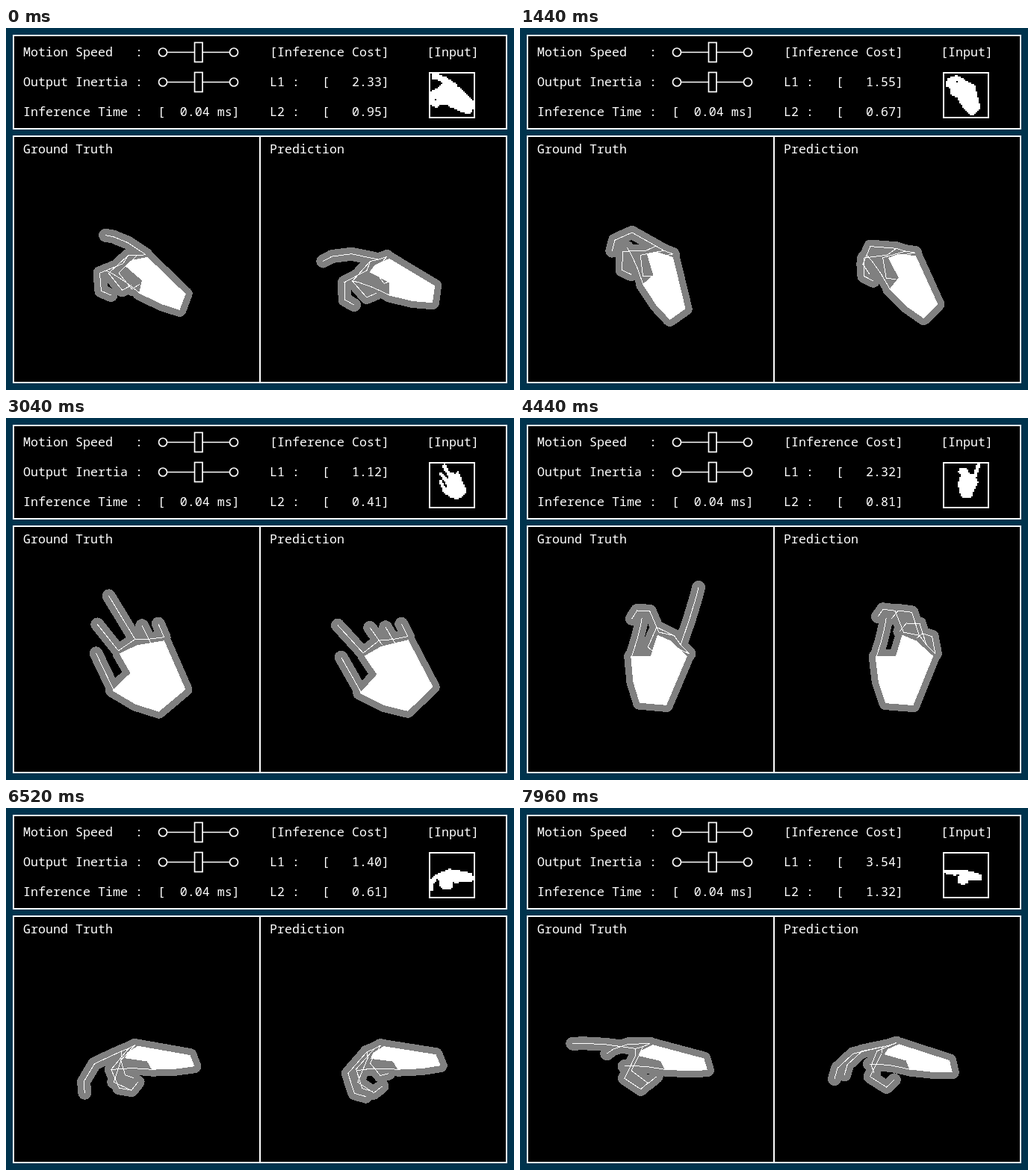
Animation of 680x485 px, one loop 8 s. Source, as an HTML page with a canvas:

```html
<!DOCTYPE html>
<html lang="en">
<head>
<meta charset="utf-8">
<title>Hand pose</title>
<style>
  html, body { margin: 0; width: 100%; height: 100%; overflow: hidden; background: #00334d; }
  svg { position: absolute; left: 0; top: 0; display: block; }
  text { font: 16.667px "Noto Sans Mono", monospace; fill: #fff; white-space: pre; }
  .frame { fill: #000; stroke: #fff; stroke-width: 2; }
  .slider { fill: #000; stroke: #fff; stroke-width: 1.7; }
  #hands { shape-rendering: crispEdges; }
  .skin { fill: none; stroke: #808080; stroke-width: 18; stroke-linejoin: round; stroke-linecap: round; }
  .skin.palm { fill: #808080; }
  .core { fill: #fff; }
  .bones { fill: none; stroke: #fff; stroke-width: 1; }
  #input { position: absolute; left: 568px; top: 61px; width: 58px; height: 58px; image-rendering: pixelated; }
</style>
</head>
<body>
<svg width="680" height="485" viewBox="0 0 680 485">
  <defs>
    <g id="slider" class="slider">
      <path d="M210 0H305"/>
      <circle cx="210" cy="0" r="5.5"/>
      <circle cx="305" cy="0" r="5.5"/>
      <rect x="252.5" y="-13" width="10.5" height="26"/>
    </g>
  </defs>
  <g class="frame">
    <rect x="10" y="10" width="660" height="125"/>
    <rect x="10" y="145" width="660" height="330"/>
    <path d="M340 145V475"/>
    <rect x="567" y="60" width="60" height="60"/>
  </g>
  <use href="#slider" y="32.5"/>
  <use href="#slider" y="72.5"/>
  <text x="23" y="38">Motion Speed   :</text>
  <text x="23" y="78">Output Inertia :</text>
  <text x="23" y="118">Inference Time :  [  0.04 ms]</text>
  <text x="353" y="38">[Inference Cost]</text>
  <text x="353" y="78" id="cost1"></text>
  <text x="353" y="118" id="cost2"></text>
  <text x="563" y="38">[Input]</text>
  <text x="23" y="168">Ground Truth</text>
  <text x="353" y="168">Prediction</text>
  <g id="hands"></g>
</svg>
<canvas id="input" width="29" height="29"></canvas>
<script>
const DURATION = 8000, STEP = 40, LAST = 7960;
const RADIANS = Math.PI / 180;
const $ = id => document.getElementById(id);

// Hand model: x runs across the palm, y from wrist to fingertips, z out of the palm.
const PALM = [
  [-30, 90], [-4, 88], [31, 75], [23, 4], [-23, -4], [-45, 20], [-63, 52], [-30, 60]
];
const CENTER_Y = 55;
const BONES = [38, 28, 15];
const THUMB = { x: -61, y: 50, size: .7, splay: .08 };
const FINGERS = [
  { x: -29, y: 94, size: .95, splay: -.15 },
  { x: -2, y: 96, size: 1.05, splay: -.02 },
  { x: 14, y: 87, size: 1, splay: .06 },
  { x: 33, y: 79, size: .77, splay: .12 }
];
const THUMB_BEND = 6;

// A pose is roll, turn about the forearm, then the bend per joint from index to little finger.
const KEYS = [
  { time: 0, costs: [2.33, .95], zoom: .465,
    truth: [-49, -62, 65, 84, 85, 12], prediction: [-62, -62, 58, 78, 20, 78] },
  { time: 1440, costs: [1.55, .67], zoom: .4,
    truth: [-17, -58, 77, 48, 85, 85], prediction: [-28, -56, 72, 62, 80, 75] },
  { time: 3040, costs: [1.12, .41], zoom: .275,
    truth: [-30, 0, 30, 20, 58, 48], prediction: [-34, 0, 27, 58, 60, 50] },
  { time: 4440, costs: [2.32, .81], zoom: .28,
    truth: [18, -40, 50, 85, 3, 85], prediction: [17, -38, 48, 48, 50, 45] },
  { time: 5320, costs: [2.09, .76], zoom: .29,
    truth: [-24, -75, 74, 27, 76, 45], prediction: [-20, -65, 82, 20, 50, 82] },
  { time: 6520, costs: [1.40, .61], zoom: .365,
    truth: [-82, -72, 80, 34, 60, 57], prediction: [-83, -72, 75, 57, 57, 68] },
  { time: LAST, costs: [3.54, 1.32], zoom: .265,
    truth: [-77, -72, 78, 5, 78, 17], prediction: [-74, -72, 80, 30, 30, 42] }
];

const lerp = (a, b, p) => a + (b - a) * p;
const mix = (a, b, p) => a.map((v, i) => lerp(v, b[i], p));
const line = points => "M" + points.map(([x, y]) => `${x.toFixed(1)} ${y.toFixed(1)}`).join("L");

function projector(cx, cy, roll, turn) {
  const c = Math.cos(roll * RADIANS), s = Math.sin(roll * RADIANS);
  const ct = Math.cos(turn * RADIANS), st = Math.sin(turn * RADIANS);
  return ([x, y, z = 0]) => {
    const across = x * ct + z * st, along = y - CENTER_Y;
    return [cx + across * c + along * s, cy + across * s - along * c];
  };
}

// Every joint adds the same bend, so a finger rolls up towards the palm.
function fingerJoints({ x, y, size, splay }, bend) {
  const joints = [[x, y, 0]];
  BONES.forEach((bone, i) => {
    const [px, py, pz] = joints[i];
    const angle = bend * (i + 1) * RADIANS;
    const forward = bone * size * Math.cos(angle);
    joints.push([px + forward * splay, py + forward, pz + bone * size * Math.sin(angle)]);
  });
  return joints;
}

function handPaths(cx, cy, [roll, turn, ...bends]) {
  const project = projector(cx, cy, roll, turn);
  const fingers = FINGERS.map((finger, i) => fingerJoints(finger, bends[i]));
  const knuckles = fingers.map(joints => joints[0]);
  const chains = [knuckles, fingerJoints(THUMB, THUMB_BEND), ...fingers];
  return {
    palm: line(PALM.map(project)) + "Z",
    bones: chains.map(chain => line(chain.map(project))).join("")
  };
}

function addPath(className) {
  const path = document.createElementNS("http://www.w3.org/2000/svg", "path");
  path.setAttribute("class", className);
  return $("hands").appendChild(path);
}

function makeHand(cx, cy) {
  const layers = ["skin palm", "skin", "core", "bones"].map(addPath);
  return pose => {
    const { palm, bones } = handPaths(cx, cy, pose);
    [palm, bones, palm, bones].forEach((d, n) => layers[n].setAttribute("d", d));
  };
}

const drawTruth = makeHand(195, 331), drawPrediction = makeHand(524, 331);
const ctx = $("input").getContext("2d", { willReadFrequently: true });

// Coarse silhouette with two-pixel cells and hard edges
function drawInput(pose, zoom) {
  const size = ctx.canvas.width;
  const { palm, bones } = handPaths(0, 0, pose);
  const body = new Path2D(palm);
  ctx.setTransform(1, 0, 0, 1, 0, 0);
  ctx.clearRect(0, 0, size, size);
  ctx.setTransform(zoom / 2, 0, 0, zoom / 2, 17, 14.25);
  ctx.fillStyle = ctx.strokeStyle = "#fff";
  ctx.lineWidth = 18;
  ctx.lineCap = ctx.lineJoin = "round";
  ctx.fill(body);
  ctx.stroke(body);
  ctx.stroke(new Path2D(bones));
  const image = ctx.getImageData(0, 0, size, size);
  for (let n = 3; n < image.data.length; n += 4) image.data[n] = image.data[n] > 127 ? 255 : 0;
  ctx.putImageData(image, 0, 0);
}

function render(time) {
  const t = Math.min(Math.floor(time / STEP) * STEP, LAST);
  let i = KEYS.length - 2;
  while (KEYS[i].time > t) i--;
  const from = KEYS[i], to = KEYS[i + 1];
  const linear = (t - from.time) / (to.time - from.time);
  const p = linear * linear * (3 - 2 * linear);
  const pose = mix(from.truth, to.truth, p);
  drawTruth(pose);
  drawPrediction(mix(from.prediction, to.prediction, p));
  drawInput(pose, lerp(from.zoom, to.zoom, p));
  mix(from.costs, to.costs, linear).forEach((cost, n) => {
    $("cost" + (n + 1)).textContent = `L${n + 1} :   [   ${cost.toFixed(2)}]`;
  });
}

const start = performance.now();
function tick() {
  render((performance.now() - start) % DURATION);
  requestAnimationFrame(tick);
}
tick();
</script>
</body>
</html>
```
